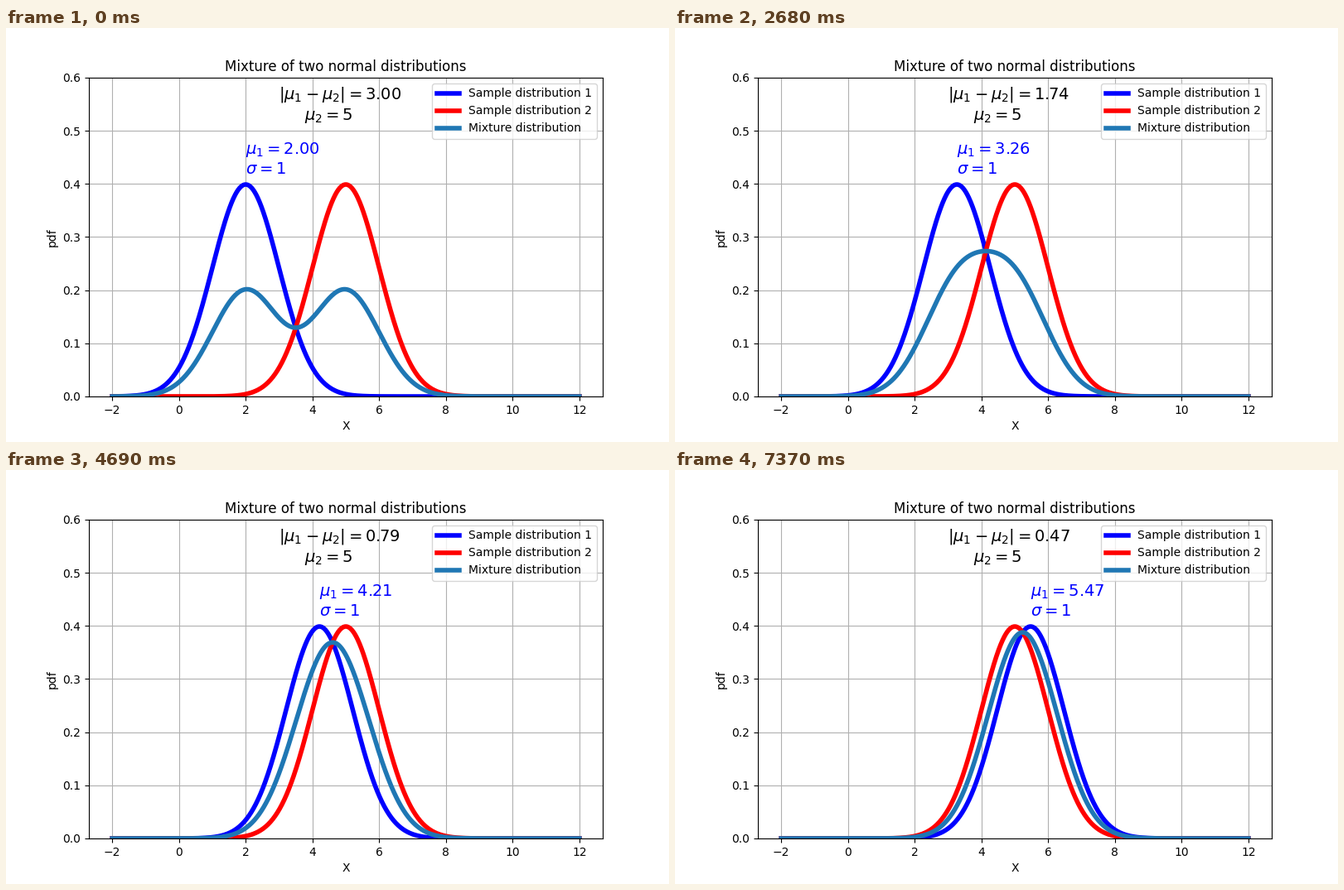
A matplotlib script that plays this animation: 800x500 px, repeating every 8000 ms.

```python
import numpy as np
import matplotlib.pyplot as plt
from matplotlib.animation import FuncAnimation

LOOP_MS = 8000
FRAMES = 12
MU2 = 5
MU1_STEPS = np.linspace(2, 8, 20)

x = np.linspace(-2, 12, 1000)


def normal_pdf(mu):
    return np.exp(-(x - mu) ** 2 / 2) / np.sqrt(2 * np.pi)


fig, ax = plt.subplots(figsize=(8, 5), dpi=100)
pdf2 = normal_pdf(MU2)

line1, = ax.plot(x, pdf2, lw=4, color="blue", label="Sample distribution 1")
ax.plot(x, pdf2, lw=4, color="red", label="Sample distribution 2")
mix, = ax.plot(x, pdf2, lw=4, color="tab:blue", label="Mixture distribution")

ax.set_ylim(0, 0.6)
ax.set_title("Mixture of two normal distributions")
ax.set_xlabel("X")
ax.set_ylabel("pdf")
ax.grid(True)
ax.legend(loc="upper right")

gap_text = ax.text(3, 0.56, "", fontsize=14)
ax.text(3.75, 0.52, rf"$\mu_2 = {MU2}$", fontsize=14)
mu_text = ax.text(2, 0.42, "", fontsize=14, color="blue")


def update(i):
    mu1 = MU1_STEPS[i]
    pdf1 = normal_pdf(mu1)
    line1.set_ydata(pdf1)
    mix.set_ydata((pdf1 + pdf2) / 2)
    gap_text.set_text(rf"$|\mu_1 - \mu_2| = {abs(mu1 - MU2):.2f}$")
    mu_text.set_x(mu1)
    mu_text.set_text(rf"$\mu_1 = {mu1:.2f}$" + "\n" + r"$\sigma = 1$")
    return line1, mix, gap_text, mu_text


anim = FuncAnimation(fig, update, frames=FRAMES, interval=LOOP_MS / FRAMES,
                     repeat=True, repeat_delay=0)
plt.show()
```
